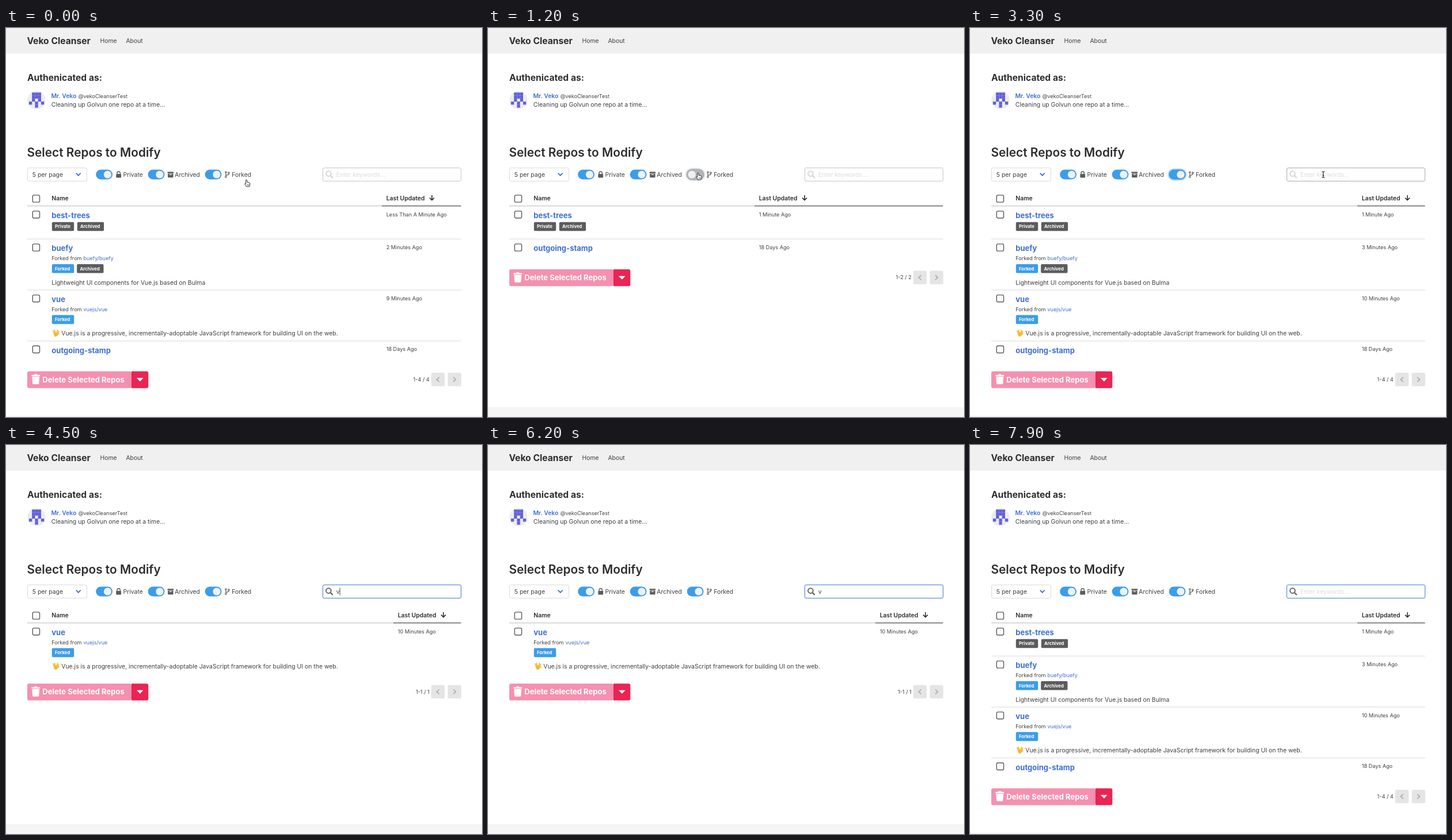
Recreate the animation shown at these times as an HTML page. Size 827x677 px, loop 8000 ms.

```html
<!DOCTYPE html>
<html lang="en">
<head>
<meta charset="utf-8">
<title>Repository list</title>
<style>
  html, body { margin: 0; width: 100%; height: 100%; overflow: hidden; background: #fff; }
  svg { display: block; width: 827px; height: 677px; }
  text { font-family: Inter, "Open Sans", sans-serif; font-optical-sizing: none; white-space: pre; }
</style>
</head>
<body>
<svg id="stage" viewBox="0 0 827 677"></svg>
<script>
const LOOP = 8000;
const DARK = '#2e2e2e', BODY = '#414141', LINK = '#3f6fd2', BLUE = '#3b9de9', GREY = '#5c5c5c';
const BASE = 10.43, SMALL = 9.12, LARGE = 13.03;
const TRACK = 28.8, KNOB = 13.2, PAD = 1.9;

const text = (x, y, str, size = BASE, fill = BODY, weight = 400, extra = '') =>
  `<text x="${x}" y="${y}" font-size="${size}" fill="${fill}" font-weight="${weight}" ${extra}>${str}</text>`;
const rect = (x, y, w, h, fill, r = 0, extra = '') =>
  `<rect x="${x}" y="${y}" width="${w}" height="${h}" rx="${r}" fill="${fill}" ${extra}/>`;
const line = (d, color, width, extra = '') =>
  `<path d="${d}" fill="none" stroke="${color}" stroke-width="${width}" ${extra}/>`;
const shape = (d, fill, extra = '') => `<path d="${d}" fill="${fill}" ${extra}/>`;
const group = (id, body, x = 0, y = 0) => `<g id="${id}" transform="translate(${x} ${y})">${body}</g>`;
const checkbox = (y) => rect(46.3, y - 6.1, 12.2, 12.2, '#fff', 2.2, 'stroke="#5a5a5a" stroke-width="1.4"');

function toggle(x, id = '') {
  return `<g ${id && `id="${id}"`}>` +
    (id ? rect(x - 1, 245.4, TRACK + 2, 19.2, BLUE, 9.6, 'class="glow" filter="url(#soft)" opacity="0"') : '') +
    rect(x, 246.5, TRACK, 17, BLUE, 8.5) +
    (id ? rect(x, 246.5, TRACK, 17, '#b5b5b5', 8.5, 'class="off" opacity="0"') : '') +
    rect(x + TRACK - PAD - KNOB, 255 - KNOB / 2, KNOB, KNOB, '#f0f0f0', KNOB / 2, 'class="knob"') + '</g>';
}

function avatar() {
  const cells = ['01110', '01110', '01010', '10101', '00100'], s = 5.25;
  let out = '<circle cx="53" cy="125.5" r="15.7" fill="#ececec"/>';
  cells.forEach((row, j) => [...row].forEach((on, i) => {
    if (+on) out += rect(39.9 + i * s, 112.3 + j * s, s + .1, s + .1, '#6161d8');
  }));
  return out;
}

const icons = {
  lock: rect(191.3, 254, 8.8, 6.6, GREY, 1) + line('M193.1 254.5v-2.2a2.6 2.6 0 0 1 5.2 0v2.2', GREY, 1.4),
  archive: rect(280.6, 250.2, 10.6, 2.6, GREY, .5) +
    shape('M281.2 253.4h9.4v6.2q0 .7-.7.7h-8q-.7 0-.7-.7z', GREY) + rect(284, 254.6, 3.8, 1.1, '#fff', .5),
  fork: [[382, 251], [387, 252.2], [382, 259]].map(([x, y]) =>
      `<circle cx="${x}" cy="${y}" r="1.3" fill="none" stroke="${GREY}" stroke-width="1.1"/>`).join('') +
    line('M382 252.4v5.2M387 253.6q0 2-2.4 2.2t-2.6 1.4', GREY, 1.2),
  trash: shape('M44.2 604.7q0-.9 .9-.9h3.6l.8-1.2h4.4l.8 1.2h3.6q.9 0 .9 .9v1.2h-15z', '#fff') +
    shape('M45.2 606.8h13l-.9 11.9q-.1 1.4-1.5 1.4h-8.2q-1.4 0-1.5-1.4z', '#fff'),
};

// small raised hand with parted fingers
const salute = (y) => `<g transform="translate(86.4 ${y})">` +
  line('M-2.6 0L-4.4-4.2M-.9-.4L-1.9-5.4M1.6-.4L3-5.2M3.1 .6L5.2-3.4M2 3.2L5.4 .8', '#f6bd3c', 2, 'stroke-linecap="round"') +
  shape('M-3.8-.6Q-.2-2 3.8-.3L4.4 2.4Q2.4 5.8 .6 5.8H-1.6Q-3.6 4-3.8-.6z', '#f6bd3c') +
  line('M.3-1L.4 1M-1.6 2Q.6 1.6 1.4 3.6', '#d9952b', .6) + '</g>';

function tag(x, y, label) {
  const wide = label === 'Archived', forked = label === 'Forked';
  return rect(x, y, wide ? 46.3 : 38.4, 15.6, forked ? BLUE : GREY, 2) +
    text(x + 5.2, y + 10.7, label, 7.82, '#fff', 700);
}

const repos = {
  trees: { name: 'best-trees', tags: ['Private', 'Archived'], h: 57.3 },
  buefy: { name: 'buefy', from: 'buefy/buefy', tags: ['Forked', 'Archived'], h: 88.7,
    note: 'Lightweight UI components for Vue.js based on Bulma' },
  vue: { name: 'vue', from: 'vuejs/vue', tags: ['Forked'], h: 88.7, hand: true,
    note: 'Vue.js is a progressive, incrementally-adoptable JavaScript framework for building UI on the web.' },
  stamp: { name: 'outgoing-stamp', tags: [], h: 36.3 },
};

function row(repo, age, y, col) {
  const tagY = y + (repo.from ? 43.6 : 27.7);
  let out = checkbox(y + 14.7) + text(79.3, y + 21, repo.name, LARGE, LINK, 700) +
    text(col + 7.7, y + 17.5, age, SMALL);
  if (repo.from) out += text(79.2, y + 37, 'Forked from', SMALL) + text(134.5, y + 37, repo.from, SMALL, LINK);
  let x = 79.8;
  for (const label of repo.tags) {
    out += tag(x, tagY, label);
    x += label === 'Private' ? 44 : 43.4;
  }
  if (repo.note) out += text(repo.hand ? 96.2 : 79.3, y + 79.3, repo.note);
  if (repo.hand) out += salute(y + 75.2);
  return out;
}

function pager(x, d) {
  return rect(x, 600, 23.4, 23.4, '#e5e5e5', 2.5) +
    line(`M${x + 11.7 - 2 * d} 607.7l${4 * d} 4l${-4 * d} 4`, '#b3b3b3', 2);
}

function list(id, col, entries, count, band) {
  let y = 310, out = checkbox(297) + text(79.3, 300, 'Name', BASE, DARK, 600) +
    text(col + 7.7, 300, 'Last Updated', BASE, DARK, 600) +
    line(`M${col + 87} 291v8.4M${col + 83} 295.6l4 4l4-4`, DARK, 1.6) +
    line(`M37 309.7H${col}`, '#c6c6c6', 1.2) + line(`M${col} 309.7H790.5`, '#4a4a4a', 1.2);
  entries.forEach(([key, age], i) => {
    if (i) out += line(`M37 ${y}H790.5`, '#dadada', 1.1);
    out += row(repos[key], age, y, col);
    y += repos[key].h;
  });
  const foot = rect(37, 597.5, 181, 29.2, '#f590b0', 3) +
    shape('M218 597.5h26.3q3 0 3 3v23.2q0 3-3 3H218z', '#ea2453') + icons.trash +
    text(63.3, 616.6, 'Delete Selected Repos', LARGE, '#fff', 700) +
    shape('M227.5 609.3h10.6l-5.3 5.6z', '#fff', 'stroke="#fff" stroke-width=".6" stroke-linejoin="round"') +
    text(735.7, 614.9, `1-${count} / ${count}`, SMALL, BODY, 400, 'text-anchor="end"') +
    pager(738.8, -1) + pager(767.5, 1);
  out += `<g transform="translate(0 ${y + 16.5 - 597.5})">${foot}</g>`;
  return group(id, out + rect(0, band, 827, 677 - band, '#f5f5f5'));
}

const stage = document.getElementById('stage');
stage.innerHTML = '<defs><filter id="soft" x="-30%" y="-40%" width="160%" height="180%"><feGaussianBlur stdDeviation="1.6"/></filter></defs>' +
  rect(0, 0, 827, 677, '#fff') + rect(0, 0, 827, 44.7, '#f0f0f0') +
  text(36.4, 27.7, 'Veko Cleanser', 15.64, DARK, 700) + text(163.4, 25.6, 'Home') + text(208.4, 25.6, 'About') +
  text(36.9, 91.6, 'Authenicated as:', 15.64, DARK, 700) + avatar() +
  text(78.4, 121.8, 'Mr. Veko', BASE, LINK, 600) + text(125.7, 121.8, '@vekoCleanserTest', SMALL) +
  text(78.8, 137.2, 'Cleaning up Golvun one repo at a time...') +
  text(36.4, 223.6, 'Select Repos to Modify', 20.85, DARK, 600) +
  rect(37.5, 243.5, 103, 23, '#fff', 2.6, 'stroke="#dbdbdb"') + text(45.8, 258.8, '5 per page') +
  line('M121.7 252.7l4 4l4-4', '#3f6fd9', 1.8) +
  toggle(156.2) + icons.lock + text(203.6, 258.8, 'Private') +
  toggle(246.7) + icons.archive + text(293.3, 258.8, 'Archived') +
  toggle(345.7, 'forked') + icons.fork + text(392.2, 258.8, 'Forked') +
  rect(549.4, 242.4, 242.2, 25.2, '#8fb0f0', 3.5, 'id="halo" opacity=".4"') +
  rect(550.5, 243.5, 240, 23, '#fff', 2.6, 'id="field"') +
  `<g id="lens"><circle cx="560.4" cy="253.6" r="4.3" fill="none" stroke-width="2"/><path d="M563.6 256.8l4.2 4.2" stroke-width="2.4"/></g>` +
  text(573.8, 258.8, 'Enter keywords...', BASE, '#dcdcdc', 400, 'id="hint"') +
  text(573.8, 258.8, '', BASE, BODY, 400, 'id="typed"') + rect(0, 248.6, .9, 13, '#333', 0, 'id="caret"') +
  list('before', 653, [['trees', 'Less Than A Minute Ago'], ['buefy', '2 Minutes Ago'], ['vue', '9 Minutes Ago'], ['stamp', '18 Days Ago']], 4, 674.5) +
  list('unforked', 463, [['trees', '1 Minute Ago'], ['stamp', '18 Days Ago']], 2, 660) +
  list('after', 673, [['trees', '1 Minute Ago'], ['buefy', '3 Minutes Ago'], ['vue', '10 Minutes Ago'], ['stamp', '18 Days Ago']], 4, 674.5) +
  list('found', 673, [['vue', '10 Minutes Ago']], 1, 660) +
  group('hand', shape('M-2.9-4.9a1.1 1.1 0 0 1 2.2 0v3.1l3.6.8Q4.6-.6 4.4 1.2L4.1 3.7 3.2 6H-1.9L-4.4 2.3Q-5 .9-3.8.6L-2.9 1.5z', '#fff', 'stroke="#222" stroke-width=".95" stroke-linejoin="round"') +
    line('M-.3 2v2.4M1.2 2v2.4M2.7 2v2.4', '#222', .6)) +
  group('arrow', shape('M-3-6V4.2L-.6 2 1 5.8 2.7 5 1.1 1.4H4.3z', '#111', 'stroke="#fff" stroke-width=".8"')) +
  group('beam', line('M-2.4-5.2Q0-5.2 0-4Q0-5.2 2.4-5.2M0-4V4M-2.4 5.2Q0 5.2 0 4Q0 5.2 2.4 5.2M-1.2 1.4H1.2', '#222', 1.1));

const $ = (id) => document.getElementById(id);
const show = (id, on) => $(id).setAttribute('visibility', on ? 'visible' : 'hidden');
const set = (el, attrs) => { for (const k in attrs) el.setAttribute(k, attrs[k]); };
const ramp = (t, a, b) => Math.min(1, Math.max(0, (t - a) / (b - a)));
const pulse = (t, a, b, fade = 100) => ramp(t, a, a + fade) - ramp(t, b, b + fade);
const ease = (p) => p * p * (3 - 2 * p);
const at = (steps, t) => steps.reduce((v, [time, value]) => (t >= time ? value : v), steps[0][1]);

const LISTS = [[0, 'before'], [1090, 'unforked'], [2390, 'after'], [4490, 'found'], [6390, 'after']];
const TYPED = [[0, ''], [4490, 'v'], [4890, 'vu'], [5090, 'vue'], [5590, 'vu'], [5990, 'v'], [6390, '']];
const CARET = [[0, 0], [3890, 1], [5690, 0], [5990, 1], [6190, 0], [6390, 1], [6890, 0], [7390, 1], [7890, 0]];

function render(t) {
  const active = at(LISTS, t), word = at(TYPED, t);
  for (const id of ['before', 'unforked', 'after', 'found']) show(id, id === active);

  // the knob stretches while pressed, then slides across
  const off = pulse(t, 1050, 2350, 150);
  const width = KNOB + 4 * (pulse(t, 870, 1050) + pulse(t, 2170, 2350));
  const sw = $('forked');
  set(sw.querySelector('.off'), { opacity: off });
  set(sw.querySelector('.knob'), { width, x: 345.7 + PAD + (1 - off) * (TRACK - 2 * PAD - width) });
  set(sw.querySelector('.glow'), { opacity: .85 * pulse(t, 870, 3750), fill: off > .5 ? '#777' : BLUE });

  const go = ease(ramp(t, 50, 600)), leave = ease(ramp(t, 2730, 3380));
  const x = 419.5 - 52.7 * go + 257.4 * leave, y = 270 - 12 * go - 3 * leave;
  const kind = x < 430 ? 'hand' : x < 551 ? 'arrow' : 'beam';
  for (const id of ['hand', 'arrow', 'beam']) {
    show(id, id === kind && t < 4490);
    set($(id), { transform: `translate(${x} ${y})` });
  }

  const focus = t >= 3790;
  show('halo', focus);
  set($('field'), { stroke: focus ? '#5a84dc' : x >= 551 ? '#a9a9a9' : '#c6c6c6' });
  set($('lens'), { stroke: focus ? '#686868' : '#d6d6d6' });
  show('hint', !word);
  const typed = $('typed');
  if (typed.textContent !== word) typed.textContent = word;
  show('caret', at(CARET, t));
  set($('caret'), { x: 573.8 + (word ? typed.getComputedTextLength() : 0) });
}

function tick() {
  render(performance.now() % LOOP);
  requestAnimationFrame(tick);
}
tick();
</script>
</body>
</html>
```
